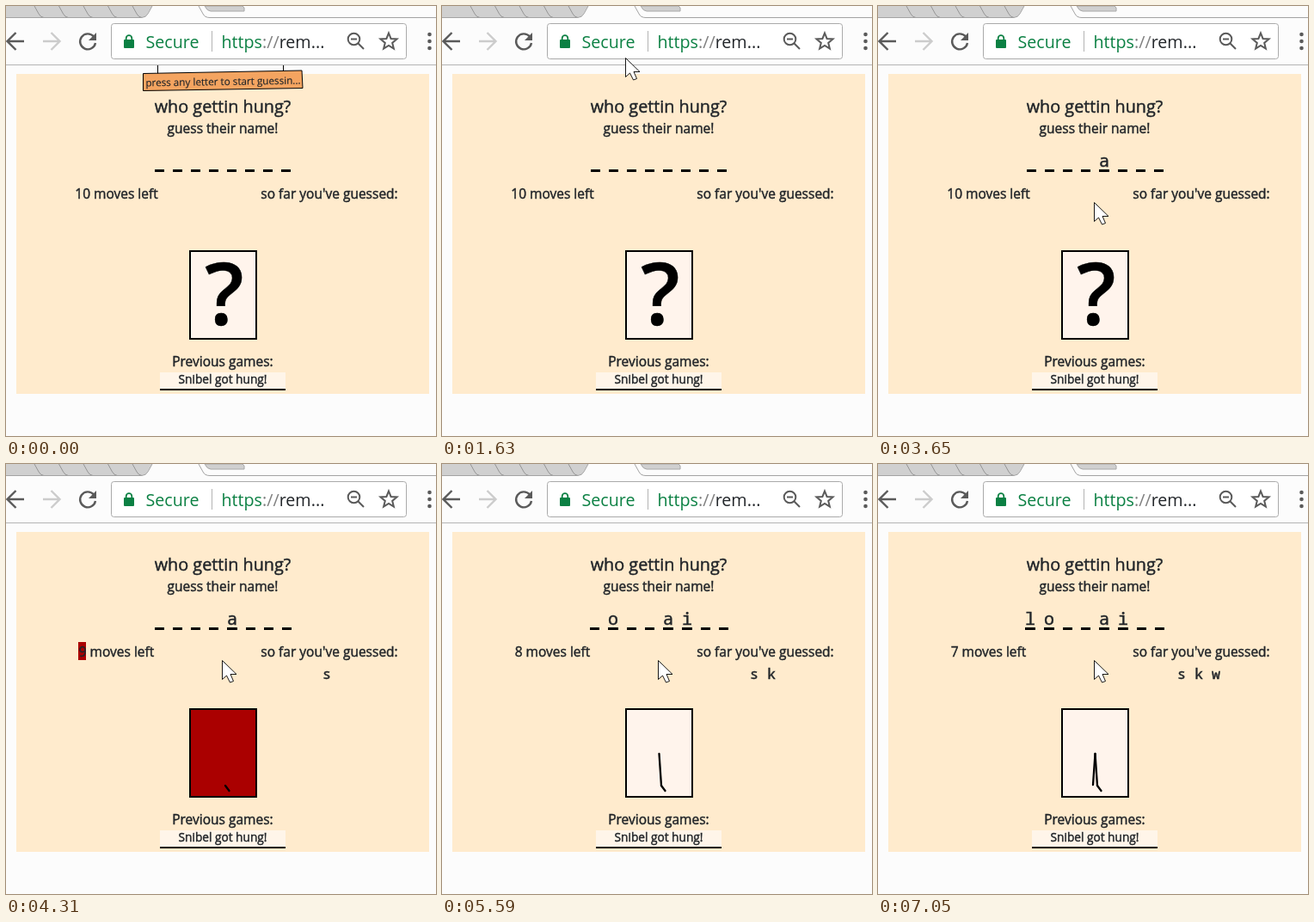
An HTML page for the animation above (8000 ms loop, 500 by 500 pixels).

```html
<!DOCTYPE html>
<html lang="en">
<head>
<meta charset="utf-8">
<title>Hangman</title>
<style>
html, body { margin: 0; width: 100%; height: 100%; overflow: hidden; background: #fcfcfc; }
svg { display: block; width: 500px; height: 500px; }
/* the thin stroke gives a medium weight */
text { font: 400 15.5px "Open Sans", "Noto Sans", sans-serif; fill: #212529; stroke: #212529; stroke-width: .45; white-space: pre; }
.mid { text-anchor: middle; }
.title { font-size: 19.8px; }
.small { font-size: 13.7px; }
.sign { font-size: 11.7px; stroke-width: .15; }
.bar { font-size: 19.7px; stroke: none; }
.big { font-size: 100px; font-weight: 600; fill: #000; stroke: #000; }
.mono { font: 400 20px "Noto Sans Mono", "DejaVu Sans Mono", monospace; text-anchor: middle; }
.tried { font-size: 16.6px; }
.line { fill: none; stroke: #5a5a5a; stroke-width: 2.4; }
.limb { fill: none; stroke: #000; stroke-width: 2.3; stroke-linecap: round; stroke-linejoin: round; }
</style>
</head>
<body>
<svg viewBox="0 0 500 500">
  <rect width="500" height="500" fill="#fcfcfc"/>
  <rect x="12" y="79" width="480" height="372" fill="#ffebcd"/>

  <text class="mid title" x="252" y="124">who gettin hung?</text>
  <text class="mid" x="252" y="148">guess their name!</text>
  <g id="word"></g>
  <rect id="mark" x="84" y="207" width="9" height="21" fill="#a00"/>
  <text id="moves" class="mid" x="128.5" y="224"></text>
  <text class="mid" x="376" y="224">so far you've guessed:</text>
  <g id="tried"></g>

  <rect x="214" y="285" width="77" height="102" fill="#fff4ec" stroke="#000" stroke-width="2"/>
  <rect id="flash" x="215" y="286" width="75" height="100" fill="#a00"/>
  <text id="ask" class="mid big" x="254" y="371">?</text>
  <path class="limb" d="M255 374L259.5 380"/>
  <path class="limb" d="M252.5 337L255 374"/>
  <path class="limb" d="M252.5 337L250 373"/>

  <text class="mid" x="252" y="419">Previous games:</text>
  <rect x="179" y="426" width="146" height="20" fill="#fff5e9"/>
  <rect x="179" y="445" width="146" height="2" fill="#000"/>
  <text class="mid small" x="252" y="439">Snibel got hung!</text>

  <g id="sign">
    <path d="M176.5 40V80M322.5 40V77" stroke="#000"/>
    <path d="M159.5 78.5L344 75L345 95.5L159.5 98.5Z" fill="#f4a460" stroke="#000"/>
    <text class="mid sign" x="252.5" y="92" transform="rotate(-.9 252 88)">press any letter to start guessin...</text>
  </g>

  <!-- browser frame -->
  <rect width="500" height="68" fill="#fcfcfc"/>
  <path d="M0 0H170L162 13H0Z" fill="#d0d0d0"/>
  <path d="M231 0H275Q278 1 277 6H238Q234 6 231 0Z" fill="#d0d0d0" stroke="#a8a8a8"/>
  <path id="tabs" fill="none" stroke="#959595"/>
  <path d="M0 13.5H158Q163 13 165 9L170 0M224 0L229 9Q231 13.5 237 13.5H500" fill="none" stroke="#a3a3a3"/>
  <path d="M0 68.5H500" stroke="#b4b4b4"/>
  <rect x="122.5" y="20.5" width="343" height="41" rx="3" fill="#fff" stroke="#aaa"/>
  <path class="line" d="M21 41H2M11.5 31L1.5 41L11.5 51"/>
  <path class="line" style="stroke:#ccc" d="M43 41H62M52.5 31L62.5 41L52.5 51"/>
  <path class="line" d="M102 35.5A9 9 0 1 0 104 43"/>
  <path d="M105 31V40H96Z" fill="#5a5a5a"/>
  <rect x="137" y="39" width="12" height="10" rx="1" fill="#0b8043"/>
  <path d="M139.7 40V37.5a3.3 3.3 0 0 1 6.6 0V40" fill="none" stroke="#0b8043" stroke-width="1.8"/>
  <text class="bar" x="162.5" y="49" style="fill:#0b8043">Secure</text>
  <path d="M239.5 29V53" stroke="#b4b4b4"/>
  <text class="bar" x="250.5" y="49"><tspan fill="#0b8043">https</tspan><tspan fill="#808080">://</tspan>rem...</text>
  <g class="line" style="stroke-width:2">
    <circle cx="404.5" cy="38.5" r="6.8"/>
    <path d="M401 38.5H408M409.5 43.5L416 50"/>
    <path id="star"/>
  </g>
  <g fill="#5a5a5a">
    <circle cx="492.5" cy="33" r="2.3"/><circle cx="492.5" cy="41" r="2.3"/><circle cx="492.5" cy="49" r="2.3"/>
  </g>

  <path id="cursor" d="M.5 .5V22.5L5.5 18L9.5 26L13.5 24.500L10 16.500H17Z" fill="#fff" stroke="#000" stroke-width=".9"/>
</svg>
<script>
const LOOP = 8000;
const $ = id => document.getElementById(id);
const limbs = document.querySelectorAll('.limb');

// Each track lists [start time, value]; a value holds until the next one.
const tracks = {
  lift: [[0, 0], [250, 1.5], [400, 7], [520, 13], [640, 20], [760, 26], [910, 40]],
  mouse: [[0, null], [1630, [213, 60]], [1780, [314, 131]], [1940, [288, 178]], [2060, [261, 213]], [2180, [251, 228]]],
  word: [[0, '________'], [3650, '____a___'], [5080, '_o__a___'], [5590, '_o__ai__'], [7050, 'lo__ai__']],
  tried: [[0, ''], [4040, 's'], [4430, 'sk'], [6090, 'skw']],
  flash: [[0, 0], [4170, .7], [4310, 1], [4430, .3], [4550, 0], [6240, .7], [6370, 1], [6520, .3], [6640, 0]]
};

function valueAt(track, t) {
  let value;
  for (const [start, v] of track) if (t >= start) value = v;
  return value;
}

const show = (el, on) => el.setAttribute('visibility', on ? 'visible' : 'hidden');
const move = (el, x, y) => el.setAttribute('transform', `translate(${x} ${y})`);
const letter = (c, x, y, cls = '') => `<text class="mono ${cls}" x="${x}" y="${y}">${c}</text>`;

// Filled cells are a little wider than blanks, so the row is centred again.
function wordMarkup(word) {
  const widths = [...word].map(c => c === '_' ? 11 : 12);
  const gap = 10;
  const total = widths.reduce((a, b) => a + b) + gap * (word.length - 1);
  let x = Math.round(252 - total / 2);
  let out = '';
  widths.forEach((w, i) => {
    out += `<rect x="${x}" y="190" width="${w}" height="3"/>`;
    if (word[i] !== '_') out += letter(word[i], x + w / 2, 187);
    x += w + gap;
  });
  return out;
}

function triedMarkup(tried) {
  const left = 373 - (tried.length - 1) * 10;
  return [...tried].map((c, i) => letter(c, left + i * 20, 250, 'tried')).join('');
}

let lastWord, lastTried;

function draw(t) {
  const now = {};
  for (const name in tracks) now[name] = valueAt(tracks[name], t);

  move($('sign'), 0, -now.lift);
  show($('cursor'), now.mouse);
  if (now.mouse) move($('cursor'), ...now.mouse);

  if (now.word !== lastWord) $('word').innerHTML = wordMarkup(lastWord = now.word);
  if (now.tried !== lastTried) {
    lastTried = now.tried;
    const misses = now.tried.length;
    $('tried').innerHTML = triedMarkup(now.tried);
    $('moves').textContent = `${10 - misses} moves left`;
    show($('ask'), !misses);
    limbs.forEach((limb, i) => show(limb, i < misses));
  }
  $('flash').setAttribute('opacity', now.flash);
  $('mark').setAttribute('opacity', now.flash);
}

$('tabs').setAttribute('d', [0, 1, 2, 3, 4].map(i => {
  const x = 33 + i * 28.5;
  return `M${x} 0L${x + 5} 9Q${x + 7} 13 ${x + 11} 13.5`;
}).join(''));

const points = [...Array(10).keys()].map(i => {
  const r = i % 2 ? 4.4 : 10;
  const a = i * Math.PI / 5 - Math.PI / 2;
  return `${(445 + r * Math.cos(a)).toFixed(2)} ${(41.5 + r * Math.sin(a)).toFixed(2)}`;
});
$('star').setAttribute('d', `M${points.join('L')}Z`);

function tick() {
  draw(performance.now() % LOOP);
  requestAnimationFrame(tick);
}
tick();
</script>
</body>
</html>
```
